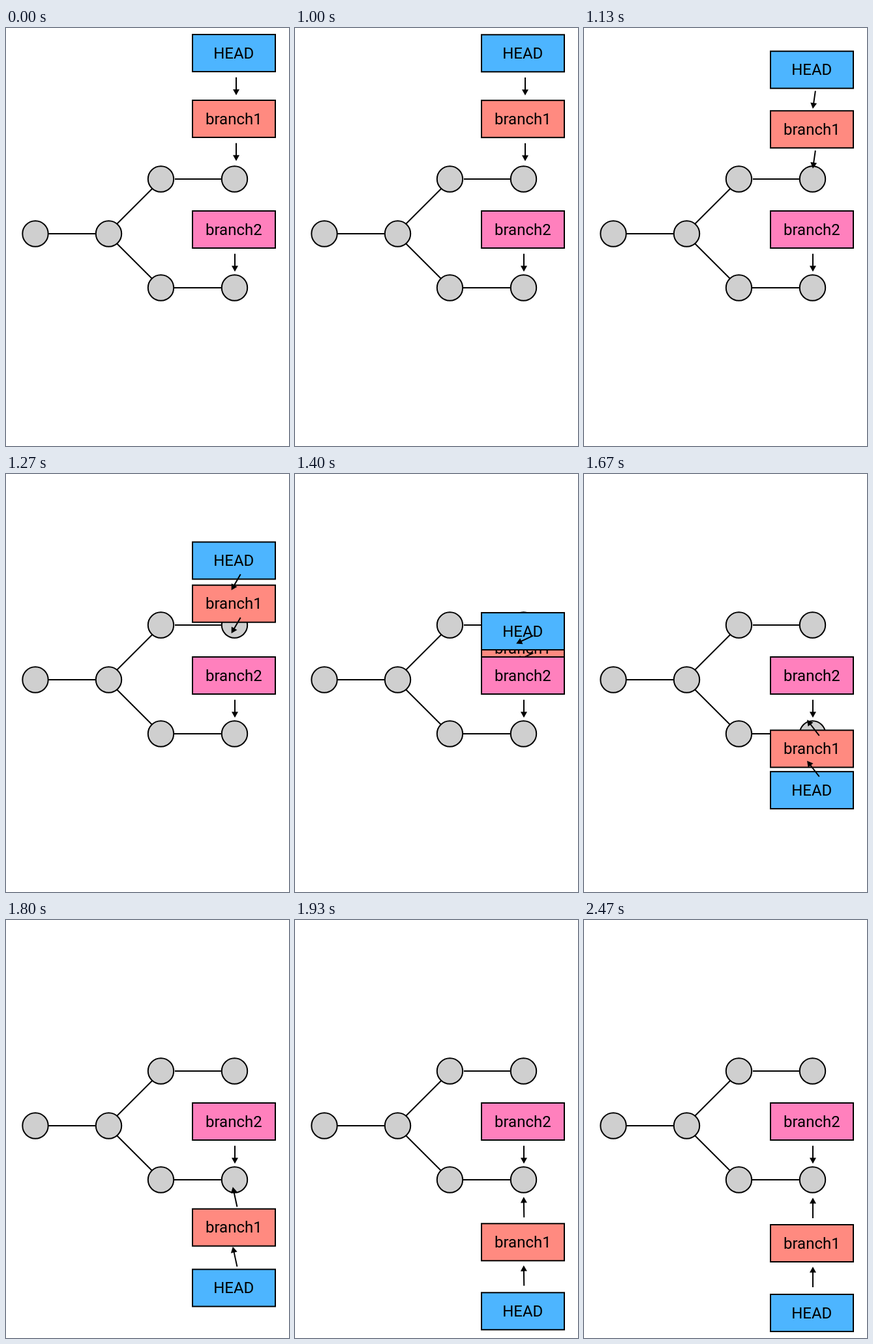
Write an HTML page that moves like this. It is 434x642 px and loops after 2930 ms.

```html
<!DOCTYPE html>
<html lang="en">
<head>
<meta charset="utf-8">
<title>Moving a branch</title>
<style>
  html, body { margin: 0; width: 100%; height: 100%; overflow: hidden; background: #fff; }
  svg { display: block; }
  .line { stroke: #000; stroke-width: 2; }
  .node { fill: #cfcfcf; stroke: #000; stroke-width: 2; }
  .box rect { stroke: #000; stroke-width: 2; }
  .box text { font: 24px Roboto, sans-serif; text-anchor: middle; }
</style>
</head>
<body>
<svg width="434" height="642" viewBox="0 0 434 642">
  <g class="line">
    <path d="M45 316H157M170 301L224 247M170 331L224 385M259 232H350M238 399H350"/>
  </g>
  <g class="node">
    <circle cx="45" cy="316" r="19.7"/>
    <circle cx="157.5" cy="316" r="19.7"/>
    <circle cx="237.5" cy="232" r="19.7"/>
    <circle cx="350.5" cy="232" r="19.7"/>
    <circle cx="237.5" cy="399" r="19.7"/>
    <circle cx="350.5" cy="399" r="19.7"/>
  </g>
  <g class="box" id="branch1">
    <rect x="286" width="127" height="57" fill="#ff8a80"/>
    <text x="349.3" y="36.5">branch1</text>
  </g>
  <g class="box" id="head">
    <rect x="286" width="127" height="57" fill="#4db5ff"/>
    <text x="349.3" y="36.5">HEAD</text>
  </g>
  <path class="arrow" id="branch1Arrow"/>
  <path class="arrow" id="headArrow"/>
  <g class="box" transform="translate(0 281)">
    <rect x="286" width="127" height="57" fill="#ff80bd"/>
    <text x="349.3" y="36.5">branch2</text>
  </g>
  <path class="arrow" id="branch2Arrow"/>
</svg>
<script>
const LOOP = 2930, START = 1000, FPS = 15;
const byId = id => document.getElementById(id);
const mix = (a, b, p) => a + (b - a) * p;

// cubic-bezier(.42, 0, .58, 1)
function easeInOut(x) {
  if (x <= 0) return 0;
  if (x >= 1) return 1;
  let lo = 0, hi = 1, u = 0.5;
  for (let i = 0; i < 30; i++) {
    u = (lo + hi) / 2;
    const v = 1 - u;
    if (1.26 * u * v * v + 1.74 * u * u * v + u * u * u < x) lo = u; else hi = u;
  }
  return u * u * (3 - 2 * u);
}

// Arrow centred on (x, y), pointing down at angle 0
function setArrow(id, x, y, length, angle) {
  const h = length / 2;
  const el = byId(id);
  el.setAttribute('d', `M-1 ${-h}H1V${h - 9}H5L0 ${h}L-5 ${h - 9}H-1Z`);
  el.setAttribute('transform', `translate(${x} ${y}) rotate(${angle})`);
}

function setBox(id, y) {
  byId(id).setAttribute('transform', `translate(0 ${y})`);
}

// Motion advances in 15 fps steps, timed to 10 ms
function progress(t) {
  if (t < START) return 0;
  const ticks = Math.floor((t - START) / 10) * 10;
  const step = Math.floor((ticks + 3.4) * FPS / 1000);
  return easeInOut(0.017 + step / FPS);
}

function draw(t) {
  const p = progress(t);
  const x = mix(353, 351, p), length = mix(27.5, 31.5, p), angle = 180 * p;
  setBox('head', mix(10, 575, p));
  setBox('branch1', mix(111, 468, p));
  setArrow('headArrow', x, mix(89.5, 548.3, p), length, angle);
  setArrow('branch1Arrow', x, mix(190.5, 442.3, p), length, angle);
}

function frame() {
  draw(performance.now() % LOOP);
  requestAnimationFrame(frame);
}

setArrow('branch2Arrow', 351, 360.5, 27.5, 0);
frame();
</script>
</body>
</html>
```
